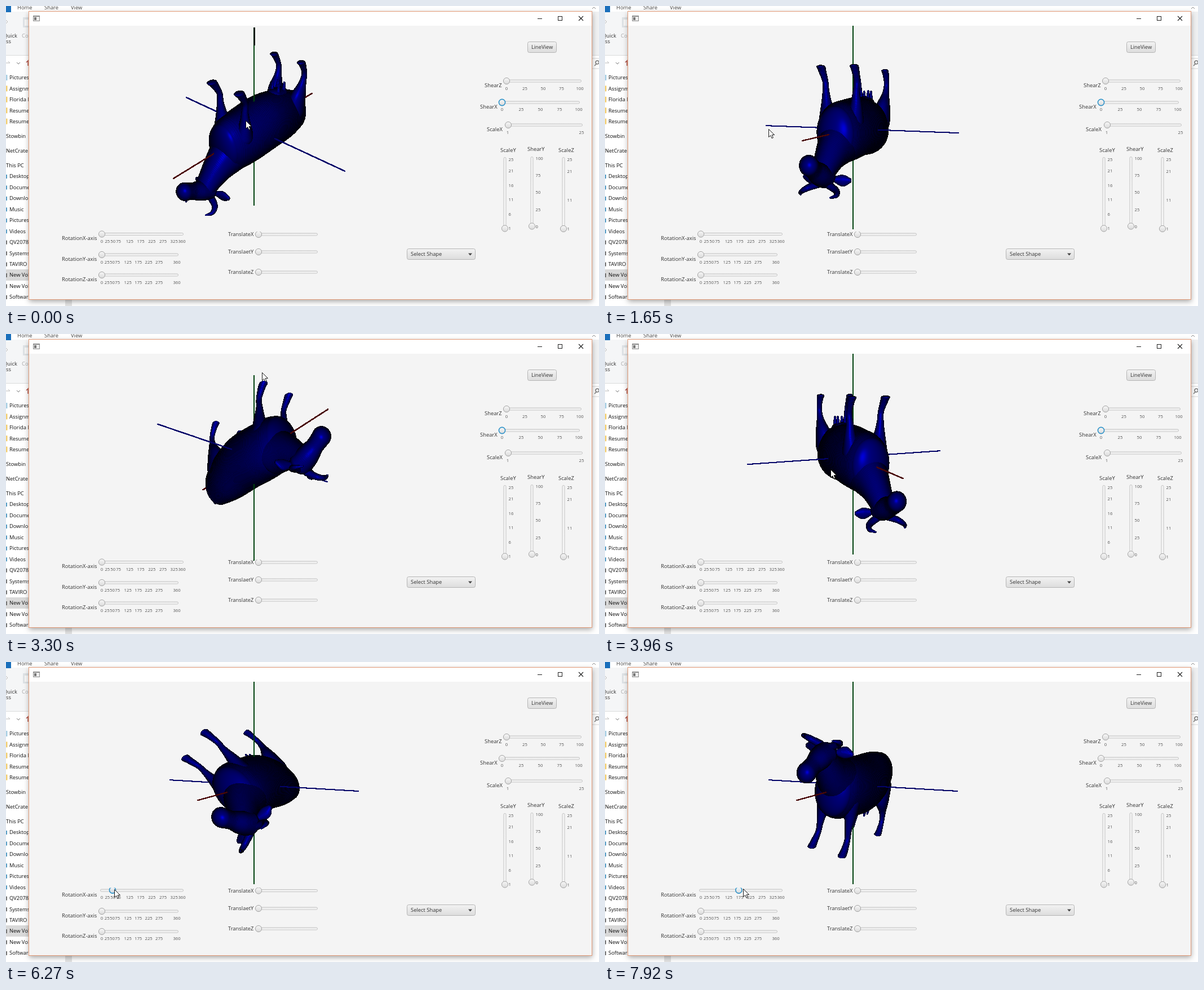
Animation of 1052 by 532 pixels, one loop 8000 ms. Source, as an HTML page with a canvas:

```html
<!DOCTYPE html>
<html lang="en">
<head>
<meta charset="utf-8">
<title>Shape viewer</title>
<style>
html, body { margin: 0; width: 100%; height: 100%; overflow: hidden; background: #f4f4f4; }
canvas { display: block; }
</style>
</head>
<body>
<canvas id="stage" width="1052" height="532"></canvas>
<script>
const ctx = document.getElementById('stage').getContext('2d');
const FONT = '"Open Sans", "Noto Sans", sans-serif';
const STEP = 330, LOOP = 8000;
const CX = 440, CY = 218, DIST = 705, AXIS = 182.5;

// Drag phase: yaw, pitch, cursor x, cursor y.
const drag = [
  [-41, 32.3, 425, 203], [-70, 29, 307, 188], [-62, 4, 350, 88], [-41.6, 10.2, 433, 113],
  [-41.6, 10.2, 354, 238], [-22, 5.4, 290, 218], [6, 0.9, 338, 202], [20.8, 0.9, 399, 202],
  [41, 37, 474, 374], [71, 37, 597, 374], [36, -27.9, 454, 68], [38, 32, 463, 341],
  [22, 10, 400, 240], [-16, 6.9, 252, 226], [-25, 7.3, 209, 226], [-25, 7.3, 171, 360],
  [-25, 7.3, 171, 396], [-25, 7.3, 173, 404]
];
// Slider phase: knob x, cursor x, cursor y.
const slide = [
  [174, 177, 403], [189, 192, 403], [227, 231, 401], [238.5, 241, 401],
  [236, 240, 402], [226, 230, 402], [237.3, 245, 402]
];

function poseAt(k) {
  const [yaw, pitch, x, y] = drag[Math.min(k, drag.length - 1)];
  const pose = { yaw, pitch, x, y, knob: 170, sliding: k >= drag.length, hover: k === 24 };
  if (pose.sliding) [pose.knob, pose.x, pose.y] = slide[k - drag.length];
  pose.roll = (pose.knob - 170) / 142 * 360;
  return pose;
}

// ---- Cow: chains of ellipsoids [along, y, side, three radii] ----
const ball = (a, y, b, r) => [a, y, b, r, r, r];
const centre = [
  [[-114, 11, 0, 18, 43, 31], [-75, 4, 0, 25, 52, 41], [-25, -2, 0, 25, 54, 47],
   [25, 0, 0, 25, 53, 45], [58, 1, 0, 22, 51, 39], [74, 0, 0, 18, 44, 33]],
  [[58, 10, 0, 22, 44, 35], [88, 27, 0, 20, 32, 26], [112, 46, 0, 17, 23, 20], [124, 57, 0, 15, 19, 18]],
  [[120, 61, 0, 15, 18, 19], [134, 55, 0, 15, 17, 17], [150, 46, 0, 13, 14, 13], [165, 37, 0, 13, 15, 14]],
  [[-128, 44, 0, 4, 5, 4], [-133, 10, 0, 3, 4, 3], [-130, -34, 0, 4, 5, 4]],
  [[-72, -46, 0, 13, 9, 14], [-56, -48, 0, 13, 9, 14]]
];
const paired = [
  [[67, -106, 29, 9, 3, 7], [61, -98, 29, 7, 5, 6], [53, -82, 28, 5, 5, 5], [53, -64, 27, 6, 6, 6],
   [52, -42, 26, 10, 10, 10], [52, -18, 23, 17, 18, 16]],
  [[-90, -106, 30, 8, 3, 7], [-96, -98, 30, 6, 5, 6], [-104, -80, 29, 5, 5, 5], [-101, -60, 28, 8, 7, 7],
   [-93, -38, 26, 16, 14, 13], [-90, -10, 21, 22, 26, 19]],
  [ball(120, 74, 9, 6), ball(126, 80, 24, 5), ball(137, 84, 29, 3.5), ball(147, 85, 24, 1.3)],
  [[113, 66, 15, 4, 4, 4], [109, 68, 27, 5, 9, 6], [108, 67, 38, 3, 4, 3]],
  [ball(-58, -53, 7, 4), ball(-59, -67, 7, 1.8)],
  [ball(-74, -53, 7, 4), ball(-75, -66, 7, 1.8)]
];

const spline = (p, q, r, s, t) => q + t / 2 * (r - p + t * (2 * p - 5 * q + 4 * r - s + t * (3 * (q - r) + s - p)));

function expand(chain) {
  const out = [];
  const at = i => chain[Math.max(0, Math.min(chain.length - 1, i))];
  for (let i = 0; i < chain.length - 1; i++) {
    const [p, q, r, s] = [at(i - 1), at(i), at(i + 1), at(i + 2)];
    const length = Math.hypot(r[0] - q[0], r[1] - q[1], r[2] - q[2]);
    const n = Math.ceil(length / Math.max(0.8, 0.13 * Math.min(q[3], r[3])));
    for (let j = 0; j < n; j++) out.push(q.map((v, c) => spline(p[c], v, r[c], s[c], j / n)));
  }
  out.push(at(chain.length - 1));
  return out;
}
const mirror = chain => chain.map(([a, y, b, ...r]) => [a, y, -b, ...r]);
const cow = [...centre, ...paired, ...paired.map(mirror)].flatMap(expand);

// ---- Scene: small depth-buffered renderer ----
const VIEW = { x: 235, y: 35, w: 410, h: 370 };
const layer = document.createElement('canvas');
layer.width = VIEW.w;
layer.height = VIEW.h;
const layerCtx = layer.getContext('2d');
const image = layerCtx.createImageData(VIEW.w, VIEW.h);
const depth = new Float32Array(VIEW.w * VIEW.h);

// Images of the model's three unit vectors in camera space.
function basis({ yaw, pitch }, roll) {
  const rad = Math.PI / 180;
  const [sy, cy, sp, cp] = [Math.sin(yaw * rad), Math.cos(yaw * rad), Math.sin(pitch * rad), Math.cos(pitch * rad)];
  const [sr, cr] = [Math.sin(roll * rad), Math.cos(roll * rad)];
  const place = (a, y0, b0) => {
    const y = y0 * cr - b0 * sr, b = y0 * sr + b0 * cr;
    const z = b * sy - a * cy;
    return [a * sy + b * cy, y * cp - z * sp, z * cp + y * sp];
  };
  return [place(1, 0, 0), place(0, 1, 0), place(0, 0, 1)];
}

function plot(x, y, t, r, g, b) {
  if (x < 0 || y < 0 || x >= VIEW.w || y >= VIEW.h) return;
  const i = y * VIEW.w + x;
  if (t >= depth[i]) return;
  depth[i] = t;
  image.data.set([r, g, b, 255], i * 4);
}

function drawAxis(dir, color, capped) {
  for (let s = -AXIS; s <= AXIS; s += 0.35) {
    const w = 1 + dir[2] * s / DIST;
    const x = Math.round(CX + dir[0] * s / w - VIEW.x - 1);
    const y = Math.round(CY + dir[1] * s / w - VIEW.y - 1);
    const cap = capped && s < -0.85 * AXIS;
    const [r, g, b] = cap ? [0, 28, 8] : color;
    for (let i = 0; i < (cap ? 3 : 2); i++)
      for (let j = 0; j < 2; j++) plot(x + i, y + j, w, r, g, b);
  }
}

function drawEllipsoid([ca, cy, cb, ra, ry, rb], m) {
  const cam = [0, 1, 2].map(i => m[0][i] * ca + m[1][i] * cy + m[2][i] * cb);
  const big = Math.max(ra, ry, rb), w = 1 + cam[2] / DIST;
  const reach = big / (w - big / DIST) + 1;
  const sx = CX + cam[0] / w - VIEW.x, sy = CY + cam[1] / w - VIEW.y;
  const x0 = Math.max(0, Math.floor(sx - reach)), x1 = Math.min(VIEW.w - 1, Math.ceil(sx + reach));
  const y0 = Math.max(0, Math.floor(sy - reach)), y1 = Math.min(VIEW.h - 1, Math.ceil(sy + reach));
  const [A, Y, B] = m;
  const oa = (-DIST * A[2] - ca) / ra, oy = (-DIST * Y[2] - cy) / ry, ob = (-DIST * B[2] - cb) / rb;
  const c = oa * oa + oy * oy + ob * ob - 1;
  for (let y = y0; y <= y1; y++) {
    const py = y + 0.5 + VIEW.y - CY;
    for (let x = x0; x <= x1; x++) {
      const px = x + 0.5 + VIEW.x - CX;
      const da = (A[0] * px + A[1] * py + A[2] * DIST) / ra;
      const dy = (Y[0] * px + Y[1] * py + Y[2] * DIST) / ry;
      const db = (B[0] * px + B[1] * py + B[2] * DIST) / rb;
      const q = da * da + dy * dy + db * db, h = oa * da + oy * dy + ob * db;
      const disc = h * h - q * c;
      if (disc < 0) continue;
      const t = (-h - Math.sqrt(disc)) / q;
      if (t >= depth[y * VIEW.w + x]) continue;
      const na = (oa + t * da) / ra, ny = (oy + t * dy) / ry, nb = (ob + t * db) / rb;
      const facing = -(na * da * ra + ny * dy * ry + nb * db * rb) /
        (Math.hypot(na, ny, nb) * Math.hypot(px, py, DIST));
      const f = Math.max(0, facing);
      plot(x, y, t, 0, 0, 4 + 122 * f ** 1.7 + 90 * f ** 70);
    }
  }
}

function renderScene(pose) {
  image.data.fill(0);
  depth.fill(Infinity);
  const axes = basis(pose, 0), model = basis(pose, pose.roll);
  drawAxis(axes[0], [72, 8, 8]);
  drawAxis(axes[1], [0, 66, 14], pose.pitch > 28);
  drawAxis(axes[2], [4, 4, 104]);
  for (const e of cow) drawEllipsoid(e, model);
  layerCtx.putImageData(image, 0, 0);
  ctx.drawImage(layer, VIEW.x, VIEW.y);
}

// ---- Interface ----
function box(x, y, w, h, fill) {
  ctx.fillStyle = fill;
  ctx.fillRect(x, y, w, h);
}

function line(points, color, width = 1) {
  ctx.strokeStyle = color;
  ctx.lineWidth = width;
  ctx.beginPath();
  points.forEach(([x, y]) => ctx.lineTo(x, y));
  ctx.stroke();
}

function text(s, x, y, size = 9.4, color = '#333', align = 'left') {
  ctx.font = `${size}px ${FONT}`;
  ctx.fillStyle = color;
  ctx.textAlign = align;
  ctx.textBaseline = 'alphabetic';
  ctx.fillText(s, x, y + size * 0.36);
}
const tick = (s, x, y, align = 'center') => text(s, x, y, 7.7, '#555', align);

function rounded(x, y, w, h, r, top, bottom, edge) {
  const g = ctx.createLinearGradient(0, y, 0, y + h);
  g.addColorStop(0, top);
  g.addColorStop(1, bottom);
  ctx.beginPath();
  ctx.roundRect(x + 0.5, y + 0.5, w - 1, h - 1, r);
  ctx.fillStyle = g;
  ctx.fill();
  ctx.strokeStyle = edge;
  ctx.lineWidth = 1;
  ctx.stroke();
}

function knob(x, y, state) {
  const g = ctx.createLinearGradient(0, y - 6, 0, y + 6);
  g.addColorStop(0, state === 'hover' ? '#f2fbff' : '#f8f8f8');
  g.addColorStop(1, state === 'press' ? '#c9d3dc' : '#d9d9d9');
  ctx.beginPath();
  ctx.arc(x, y, 5.6, 0, 7);
  ctx.fillStyle = g;
  ctx.fill();
  ctx.strokeStyle = state ? '#2f93c9' : '#a5a5a5';
  ctx.lineWidth = state ? 1.6 : 1;
  ctx.stroke();
}

function clippedBelow(y, draw) {
  ctx.save();
  ctx.beginPath();
  ctx.rect(0, y, 1052, 532);
  ctx.clip();
  draw();
  ctx.restore();
}

const track = (x0, x1, y) => rounded(x0, y - 2.5, x1 - x0, 5, 2, '#e6e6e6', '#fdfdfd', '#c3c3c3');
const column = (x, y0, y1) => rounded(x - 2.5, y0, 5, y1 - y0, 2, '#f4f4f4', '#f8f8f8', '#c3c3c3');

function explorer() {
  box(0, 0, 1052, 532, '#fff');
  box(0, 10, 1052, 77, '#f5f6f7');
  box(0, 87, 1052, 1, '#dadbdc');
  box(0, 0, 9, 11, '#1a6fbb');
  [['Home', 20], ['Share', 68], ['View', 115]].forEach(([s, x]) => text(s, x, 3, 9.4, '#444'));
  line([[0, 25], [3, 28], [0, 31]], '#bbb');
  box(30, 20, 11, 18, '#dfe3e6');
  box(33, 24, 8, 11, '#f8f8f8');
  text('Quick', -5, 53, 9.4, '#333');
  text('Co', 28, 53, 9.4, '#aaa');
  text('ss', 0, 63, 9.4, '#333');
  line([[0, 101], [7, 101], [4, 98]], '#bbb');
  line([[19, 100], [22, 103], [25, 100]], '#777');
  line([[39, 106], [39, 97], [36, 100]], '#b4544a', 1.5);
  box(0, 467, 41, 20, '#d9d9d9');
  const nested = ['Pictures', 'Assignment', 'Florida I', 'Resume', 'Resume'];
  const top = ['Stowbin', 'NetCrate', 'This PC'];
  const drives = ['Desktop', 'Documents', 'Downloads', 'Music', 'Pictures', 'Videos', 'QV2078', 'Systems', 'TAVIRO', 'New Volume', 'New Volume', 'Software'];
  nested.forEach((s, i) => {
    const y = 127 + i * 19.4;
    text(s, 6, y, 9.4, '#111');
    box(0, y - 5, 2.5, 10, i ? '#f3cf73' : '#a9cfe4');
  });
  top.forEach((s, i) => text(s, 0, 231 + i * 25.7, 9.4, '#111'));
  drives.forEach((s, i) => {
    const y = 302 + i * 19.45;
    text(s, 6, y, 9.4, '#111');
    box(0, y - 3, 2, 7, i < 6 ? '#5b9fc6' : '#777');
  });
  box(105, 520, 12, 12, '#e3e3e3');
  box(1040, 10, 12, 77, '#f0f1f2');
  ctx.strokeStyle = '#777';
  ctx.beginPath();
  ctx.arc(1049, 100, 3, 0, 7);
  ctx.stroke();
  line([[1047, 103], [1044, 106]], '#777', 1.5);
  line([[1040, 93], [1052, 93]], '#d5d5d5');
  line([[1040, 111], [1052, 111]], '#d5d5d5');
  line([[1040, 5], [1043, 2], [1046, 5]], '#888');
}

function windowFrame() {
  ctx.save();
  ctx.shadowColor = 'rgba(0,0,0,.35)';
  ctx.shadowBlur = 9;
  ctx.shadowOffsetY = 3;
  box(41, 10, 999, 511, '#fff');
  ctx.restore();
  box(41, 35, 999, 486, '#f4f4f4');
  ctx.strokeStyle = '#e39a76';
  ctx.lineWidth = 1;
  ctx.strokeRect(40.5, 9.5, 999, 511);
  box(48, 17, 12, 10, '#8b8b8b');
  box(49, 19, 10, 7, '#eee');
  box(50, 20, 4, 5, '#777');
  line([[943, 22.5], [951, 22.5]], '#222');
  ctx.strokeStyle = '#222';
  ctx.strokeRect(979.5, 18.5, 7, 7);
  line([[1016, 18], [1024, 26]], '#222', 1.1);
  line([[1024, 18], [1016, 26]], '#222', 1.1);
}

function rightPanel(sliding) {
  rounded(925, 63, 52, 20, 3, '#f3f3f3', '#dcdcdc', '#b5b5b5');
  text('LineView', 951, 73, 9.3, '#333', 'center');

  text('ShearZ', 849, 141);
  text('ShearX', 841, 179);
  text('ScaleX', 853, 219);
  track(885, 1021, 133);
  track(877, 1018, 171);
  track(888, 1023, 211);
  for (let i = 0; i < 5; i++) {
    tick(i * 25, 888 + i * 32.5, 146);
    tick(i * 25, 880 + i * 34, 183);
  }
  tick(1, 890, 224);
  tick(25, 1021, 224);
  knob(888, 133);
  knob(880, 171, sliding ? '' : 'focus');
  knob(891, 211);

  text('ScaleY', 877, 256);
  text('ShearY', 925, 254);
  text('ScaleZ', 980, 256);
  column(885, 268, 398);
  column(933, 267, 394);
  column(989, 268, 399);
  const level = v => 394.5 - (v - 1) * 5.1;
  [1, 6, 11, 16, 21, 25].forEach(v => tick(v, 891.5, level(v), 'left'));
  [1, 11, 21, 25].forEach(v => tick(v, 995.5, level(v) + 0.5, 'left'));
  [0, 25, 50, 75, 100].forEach(v => tick(v, 939.5, 391 - v * 1.21, 'left'));
  knob(885, 394.5);
  knob(933, 390.5);
  knob(989, 395);

  rounded(711, 430, 122, 20, 3, '#f3f3f3', '#dcdcdc', '#b5b5b5');
  text('Select Shape', 718, 440);
  ctx.fillStyle = '#444';
  ctx.beginPath();
  [[820, 438.5], [827, 438.5], [823.5, 442.5]].forEach(([x, y]) => ctx.lineTo(x, y));
  ctx.fill();
}

function bottomPanel(pose) {
  const shift = pose.sliding ? 1 : 0;
  const marks = [0, 25, 50, 75, 125, 175, 225, 275];
  ['X', 'Y', 'Z'].forEach((name, i) => {
    const y = [404.5, 441, 477][i], span = i ? 133 : 142;
    text(`Rotation${name}-axis`, 99, [412, 449, 485][i] + shift);
    track(167, i ? 306 : 315, y + shift * (i ? 1 : 0.5));
    [...marks, ...(i ? [360] : [325, 360])].forEach(v => tick(v, 170 + v / 360 * span, [417, 454, 490][i]));
    if (i) knob(170, y + shift);
    else clippedBelow(pose.sliding ? 400.5 : 0, () =>
      knob(pose.knob, y, pose.sliding ? (pose.hover ? 'hover' : 'press') : ''));

    const ty = [405, 436, 472][i] + (i ? shift : shift / 2);
    text(['TranslateX', 'TranslaetY', 'TranslateZ'][i], 394, ty);
    track(445, 553, ty);
    clippedBelow(i ? 0 : 400, () => knob(448, ty));
  });
}

function cursor(x, y) {
  const shape = [[0, 0], [0, 14], [3.2, 11], [5.5, 16], [7.8, 15], [5.6, 10.2], [10, 10]];
  ctx.beginPath();
  shape.forEach(([dx, dy]) => ctx.lineTo(x + 0.5 + dx, y + 0.5 + dy));
  ctx.closePath();
  ctx.fillStyle = '#fff';
  ctx.fill();
  ctx.strokeStyle = '#000';
  ctx.lineWidth = 0.9;
  ctx.stroke();
}

function draw(k) {
  const pose = poseAt(k);
  explorer();
  windowFrame();
  rightPanel(pose.sliding);
  bottomPanel(pose);
  renderScene(pose);
  cursor(pose.x, pose.y);
}

let shown = -1;
function tickFrame(now) {
  const k = Math.min(24, Math.floor(now % LOOP / STEP));
  if (k !== shown) draw(shown = k);
  requestAnimationFrame(tickFrame);
}
tickFrame(0);
</script>
</body>
</html>
```
